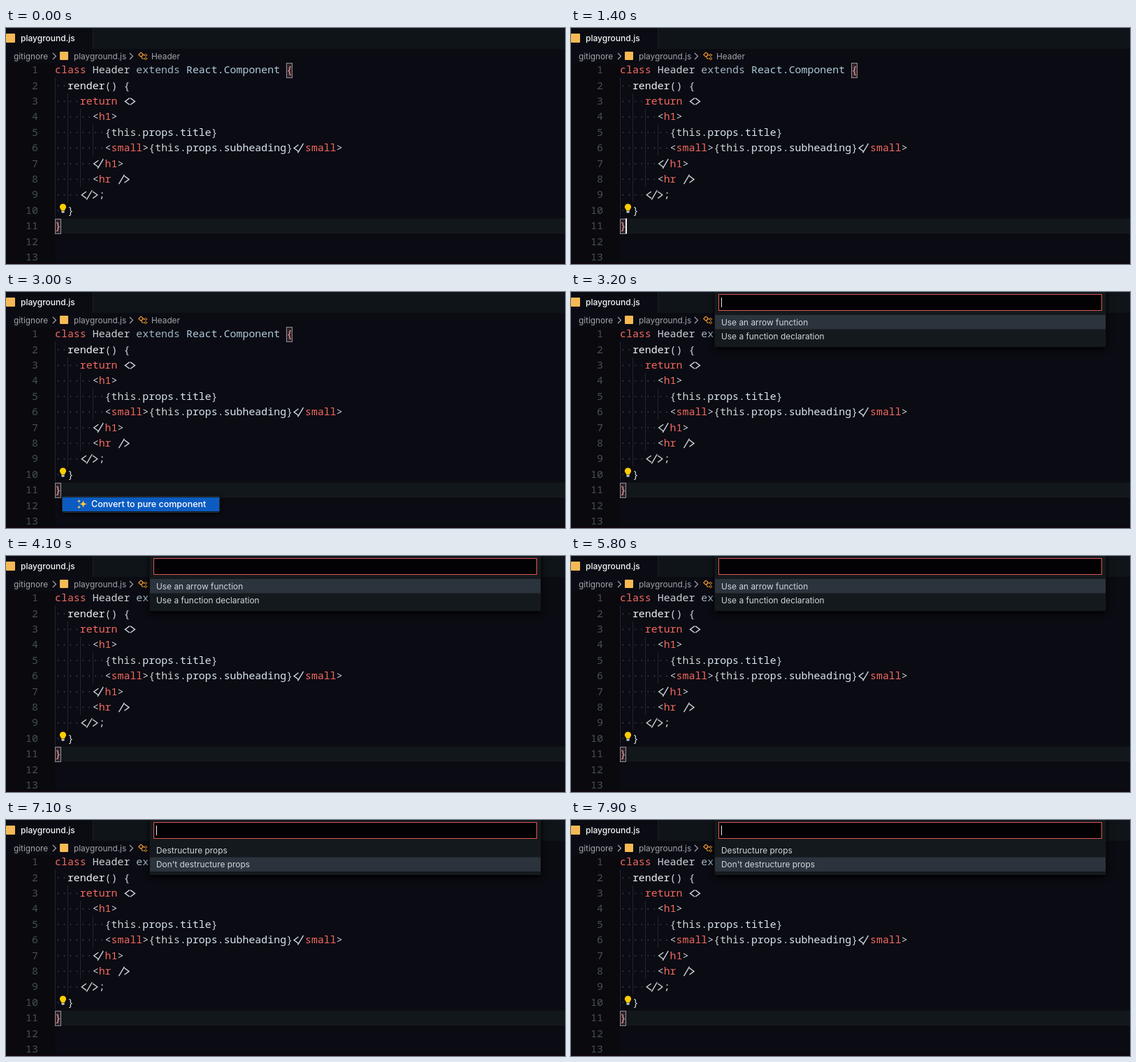
Recreate the animation shown at these times as an HTML page with a canvas. Size 800 px wide and 339 px high, loop 8000 ms.

```html
<!DOCTYPE html>
<html lang="en">
<head>
<meta charset="utf-8">
<title>Code editor</title>
<style>
  html, body { margin: 0; width: 100%; height: 100%; overflow: hidden; background: #0b0b13; }
  canvas { display: block; width: 800px; height: 339px; }
</style>
</head>
<body>
<canvas id="stage" width="800" height="339"></canvas>
<script>
const ctx = document.getElementById('stage').getContext('2d');

const LOOP = 8000, BLINK = 500;
const MENU_OPEN = 1600, STYLE_OPEN = 3200, PROPS_OPEN = 5900, SELECT_SECOND = 6900;

const CODE_FONT = '500 14.92px "Noto Sans Mono", "DejaVu Sans Mono", monospace';
const NUMBER_FONT = CODE_FONT.replace('500', '400');
const uiFont = (size, weight = 400) => `${weight} ${size}px Inter, Roboto, sans-serif`;
const LEFT = 70, CELL = 8.95, ROW = 22.4, FIRST_ROW = 60, BASELINE = 5.2;
const colX = col => LEFT + col * CELL;
const rowY = row => FIRST_ROW + (row - 1) * ROW;

const C = {
  bg: '#0b0b13', gutter: '#09090e', bar: '#0f1418', line: '#12171b', guide: '#22262c', dot: '#3e444b',
  number: '#474f57', red: '#f26a5e', pale: '#cbd4da', prop: '#d8e6f0', white: '#f1f4f6',
  steel: '#9db4c2', type: '#aecbdb', icon: '#f7b955', crumb: '#a0a6ab', text: '#d0d6dc'
};

// Each token: text and colour. Tokens listed in LIGATURES are drawn as joined strokes.
const { red, pale, prop, white, steel, type } = C;
const open = ['<', pale], shut = ['>', pale], closing = ['</', pale];
const CODE = [
  [0, ['class ', red], ['Header ', pale], ['extends ', steel], ['React', type], ['.', pale], ['Component', type]],
  [2, ['render', white], ['() {', pale]],
  [4, ['return ', red], ['<>', pale]],
  [6, open, ['h1', red], shut],
  [8, ['{', pale], ['this', pale], ['.', pale], ['props', prop], ['.', pale], ['title', prop], ['}', pale]],
  [8, open, ['small', red], shut, ['{', pale], ['this', pale], ['.', pale], ['props', prop],
      ['.', pale], ['subheading', prop], ['}', pale], closing, ['small', red], shut],
  [6, closing, ['h1', red], shut],
  [6, open, ['hr ', red], ['/>', pale]],
  [4, ['</>', pale], [';', pale]],
  [2, ['}', pale]]
];

function rect(x, y, w, h, color) {
  ctx.fillStyle = color;
  ctx.fillRect(x, y, w, h);
}

function disc(x, y, r, color) {
  ctx.fillStyle = color;
  ctx.beginPath();
  ctx.arc(x, y, r, 0, Math.PI * 2);
  ctx.fill();
}

function panel(x, y, w, h, r, color) {
  ctx.fillStyle = color;
  ctx.beginPath();
  ctx.roundRect(x, y, w, h, r);
  ctx.fill();
}

function stroke(points, color, width = 1) {
  ctx.strokeStyle = color;
  ctx.lineWidth = width;
  ctx.beginPath();
  points.forEach(([x, y]) => ctx.lineTo(x, y));
  ctx.stroke();
}

function label(text, x, y, font, color, align = 'left') {
  ctx.font = font;
  ctx.textAlign = align;
  ctx.fillStyle = color;
  ctx.fillText(text, x, y);
}

function star(x, y, r, color) {
  ctx.fillStyle = color;
  ctx.beginPath();
  ctx.moveTo(x, y - r);
  [[1, 0], [0, 1], [-1, 0], [0, -1]].forEach(([dx, dy]) =>
    ctx.quadraticCurveTo(x, y, x + dx * r, y + dy * r));
  ctx.fill();
}

function angle(tip, y, dir, color) {
  const end = tip + dir * 6.5;
  stroke([[end, y - 4.8], [tip, y], [end, y + 4.8]], color, 1.4);
}

function slash(x, y, color) {
  stroke([[x, y + 6.8], [x + 8, y - 6.8]], color, 1.4);
}

const LIGATURES = {
  '<>': (x, y, c) => { angle(x + 2, y, 1, c); angle(x + 16, y, -1, c); },
  '</': (x, y, c) => { angle(x + 2, y, 1, c); slash(x + 7.5, y, c); },
  '/>': (x, y, c) => { slash(x + 2, y, c); angle(x + 16.5, y, -1, c); },
  '</>': (x, y, c) => { angle(x + 2.5, y, 1, c); slash(x + 9.5, y, c); angle(x + 25, y, -1, c); }
};

function drawHeader() {
  rect(124, 0, 676, 30, C.bar);
  rect(124, 0, 1, 30, '#1b2127');
  panel(0, 8, 13, 13, 1, C.icon);
  label('playground.js', 21, 19, uiFont(12, 500), '#f4f6f8');

  const font = uiFont(11.8);
  label('gitignore', 11, 44.5, font, C.crumb);
  label('playground.js', 97, 44.5, font, C.crumb);
  label('Header', 208, 44.5, font, C.crumb);
  panel(77, 34, 12, 12, 1, C.icon);
  [67, 177].forEach(x => stroke([[x, 36], [x + 4.5, 40.5], [x, 45]], C.crumb, 1.2));
  drawSymbol();
}

function drawSymbol() {
  const amber = '#e8952c';
  stroke([[193, 35], [196.5, 38], [193, 41.5], [189.8, 38.4], [193, 35]], amber, 1.2);
  stroke([[195.5, 39], [198, 39]], amber);
  stroke([[194.5, 40], [194.5, 44], [198, 44]], amber);
  [39, 44].forEach(y => stroke([[198, y], [200, y - 1.7], [202, y], [200, y + 1.7], [198, y]], amber));
}

function drawBracket(text, col, row) {
  const x = Math.round(colX(col)), y = rowY(row), top = Math.round(y - 10.5);
  rect(x, top, 9, 22, '#33232b');
  ctx.strokeStyle = '#8f9092';
  ctx.lineWidth = 1;
  ctx.strokeRect(x + 0.5, top + 0.5, 8, 21);
  label(text, colX(col), y + BASELINE, CODE_FONT, '#e9a29d');
}

function drawBulb() {
  rect(76, 252, 11, 15, C.bg);
  disc(81.5, 257, 4.6, '#ffcc00');
  panel(79, 259.5, 5, 3, 0, '#ffcc00');
  panel(79.3, 263, 4.4, 2.4, 1, '#c9ced2');
}

function drawCode() {
  rect(0, 50, LEFT, 289, C.gutter);
  rect(LEFT, 273.5, 800 - LEFT, 22, C.line);
  for (let depth = 0; depth < 4; depth++) {
    const last = [10, 9, 8, 6][depth];
    const top = rowY(depth + 2) - ROW / 2;
    rect(Math.round(colX(depth * 2)), top, 1, rowY(last) + ROW / 2 - top, C.guide);
  }
  for (let row = 1; row <= 13; row++)
    label(String(row), 46, rowY(row) + BASELINE, NUMBER_FONT, C.number, 'right');

  CODE.forEach(([indent, ...tokens], i) => {
    const y = rowY(i + 1);
    for (let col = 0; col < indent; col++) disc(colX(col + 0.5), y + 0.5, 0.9, C.dot);
    let col = indent;
    for (const [text, color] of tokens) {
      const ligature = LIGATURES[text];
      if (ligature) ligature(colX(col), y + 0.6, color);
      else label(text, colX(col), y + BASELINE, CODE_FONT, color);
      col += text.length;
    }
  });
  drawBracket('{', 37, 1);
  drawBracket('}', 0, 11);
  drawBulb();
  rect(0, 337, 800, 2, '#10060f');
}

function withShadow(blur, offset, draw) {
  ctx.save();
  ctx.shadowColor = '#000';
  ctx.shadowBlur = blur;
  ctx.shadowOffsetY = offset;
  draw();
  ctx.restore();
}

function drawMenu() {
  withShadow(5, 1, () => panel(80, 293, 226, 24, 3, '#2a323b'));
  rect(81, 294, 224, 22, '#14191e');
  rect(81, 295, 224, 20, '#0b5cc2');
  star(110.5, 304.5, 6.3, '#ffc83d');
  star(104.5, 300.5, 3.2, '#ffd86b');
  star(104.5, 309, 3, '#ffd86b');
  label('Convert to pure component', 122, 309.3, uiFont(12.5, 500), '#fff');
}

function drawPicker(items, selected, caret) {
  withShadow(8, 3, () => rect(205.5, -4, 560, 83, '#14191d'));
  rect(211, 3, 549, 24, '#020204');
  ctx.strokeStyle = '#dc574f';
  ctx.lineWidth = 1;
  ctx.strokeRect(211.5, 3.5, 548, 23);
  rect(206, selected ? 53.5 : 33, 559, 20.5, '#2b333c');
  items.forEach((item, i) => label(item, 215, 47.5 + i * 20.5, uiFont(11.9), C.text));
  if (caret) rect(215, 8, 1, 14, '#e4e8eb');
}

const blinkOn = elapsed => Math.floor(elapsed / BLINK) % 2 === 0;

function render(t) {
  rect(0, 0, 800, 339, C.bg);
  drawHeader();
  drawCode();
  if (t < MENU_OPEN) {
    if (blinkOn(t + 800)) rect(78, 273.5, 2, 22, '#f2f4f5');
  } else if (t < STYLE_OPEN) {
    drawMenu();
  } else if (t < PROPS_OPEN) {
    drawPicker(['Use an arrow function', 'Use a function declaration'], 0, blinkOn(t - STYLE_OPEN));
  } else {
    drawPicker(['Destructure props', "Don't destructure props"], t >= SELECT_SECOND ? 1 : 0, blinkOn(t - PROPS_OPEN));
  }
}

const start = performance.now();
function tick() {
  render((performance.now() - start) % LOOP);
  requestAnimationFrame(tick);
}
tick();
</script>
</body>
</html>
```
